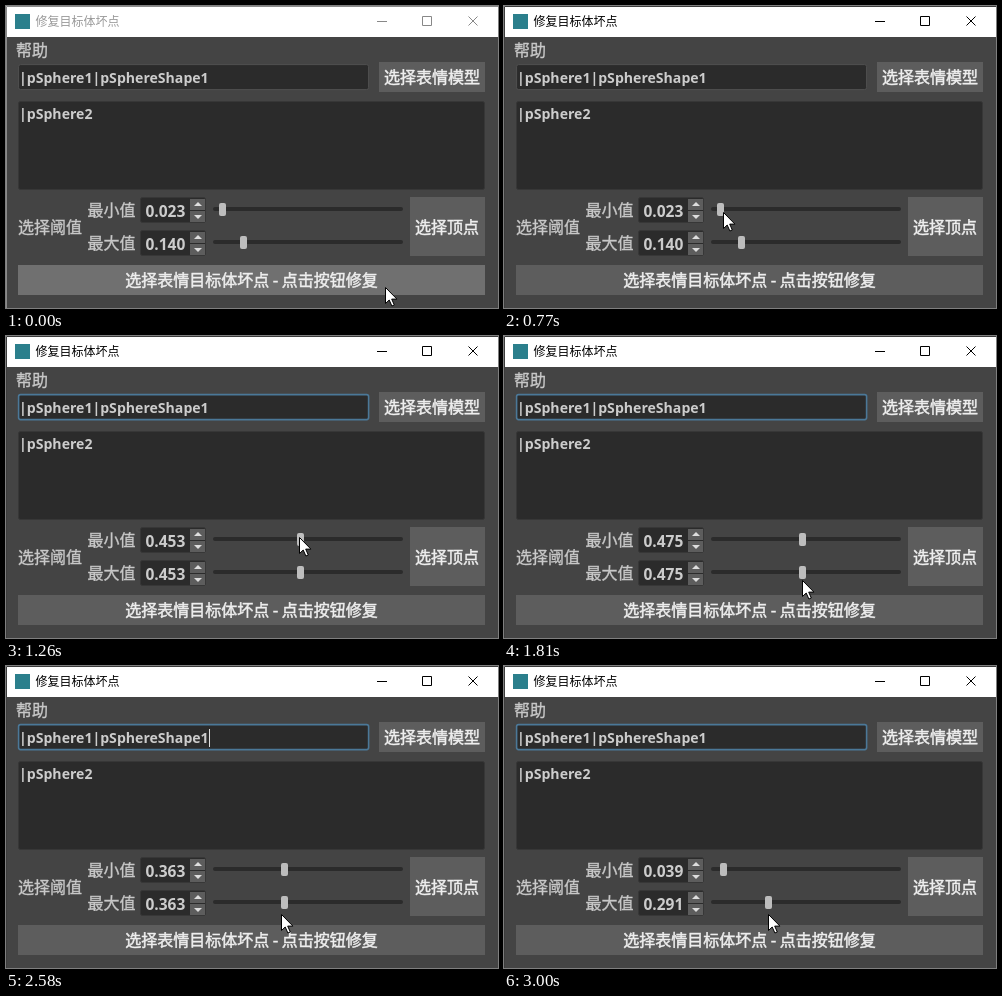
Write an HTML page that moves like this. It is 492 px wide and 302 px high and loops after 3.07 s.

```html
<!DOCTYPE html>
<html lang="zh">
<head>
<meta charset="utf-8">
<title>修复目标体坏点</title>
<style>
html, body { margin: 0; width: 100%; height: 100%; overflow: hidden; background: #444; }
svg { display: block; }
text { font: 400 16px "Noto Sans CJK SC", "Noto Sans CJK", sans-serif; white-space: pre; }
.latin, .num { font: 700 14.1px "Open Sans", sans-serif; fill: #ccc; }
.num { font-size: 15.5px; }
.label { fill: #c8c8c8; stroke: #c8c8c8; stroke-width: .35; }
.push { fill: #eee; stroke: #eee; stroke-width: .5; text-anchor: middle; }
.title { font-size: 12px; }
.btn { fill: #5d5d5d; }
.box { fill: #2b2b2b; stroke: #373737; }
.groove { fill: #2b2b2b; }
.handle { fill: #bdbdbd; }
.arrow { fill: #ddd; }
#field { stroke: #505050; }
#field.focused { stroke: #4b7898; stroke-width: 1.6; }
</style>
</head>
<body>
<svg width="492" height="302" viewBox="0 0 492 302">
  <rect width="492" height="302" fill="#444"/>
  <rect width="492" height="31" fill="#fff"/>
  <rect x="9" y="8" width="15" height="15" fill="#2b7f8c"/>
  <text id="title" class="title" x="29.5" y="20">修复目标体坏点</text>
  <path id="controls" fill="none" d="M371 15.5h10M416.5 10.5h9v9h-9zM462.5 10.5l9 9m0-9l-9 9"/>
  <path id="frame" fill="none" d="M.5 302V.5H492"/>

  <text class="label" x="10" y="50">帮助</text>
  <rect id="field" class="box" x="12.6" y="58.6" width="350" height="25" rx="2"/>
  <text class="latin" x="13" y="77">|pSphere1|pSphereShape1</text>
  <rect id="caret" x="203" y="63" width="1" height="18" fill="#ddd"/>
  <rect class="btn" x="373" y="56" width="106" height="30"/>
  <text class="push" x="426" y="77">选择表情模型</text>

  <rect class="box" x="12.5" y="95.5" width="466" height="88" rx="2"/>
  <text class="latin" x="13" y="113">|pSphere2</text>

  <text class="label" x="12" y="227">选择阈值</text>
  <g id="rows"></g>
  <rect class="btn" x="404" y="191" width="75" height="59"/>
  <text class="push" x="441" y="227">选择顶点</text>

  <rect id="fix" class="btn" x="12" y="259" width="467" height="30"/>
  <text class="push" x="245.5" y="280">选择表情目标体坏点 - 点击按钮修复</text>

  <path id="cursor" d="M.5 .5v16l3.7-3.5 2.7 6 2.4-1-2.6-5.9h5.2z" fill="#fff" stroke="#000"/>
</svg>
<script>
const LOOP = 3070, STEP = 70, TRAVEL = 182;
const $ = id => document.getElementById(id);

const row = (name, y) => `
  <text class="label" x="81.5" y="${y + 7}">${name}</text>
  <rect class="box" x="134.5" y="${y - 11.5}" width="65" height="25" rx="2"/>
  <path class="btn" d="M184 ${y - 10}h15v11h-15zm0 12h15v11h-15z"/>
  <path class="arrow" d="M188 ${y - 3}h8l-4-4zm0 9h8l-4 4z"/>
  <text class="num" x="139.5" y="${y + 8}"></text>
  <rect class="groove" x="207" y="${y - 2}" width="190" height="4" rx="2"/>
  <rect class="handle" y="${y - 6}" width="7" height="13" rx="2"/>`;

$("rows").innerHTML = row("最小值", 203) + row("最大值", 236);
const numbers = document.querySelectorAll(".num");
const handles = document.querySelectorAll(".handle");

// Linear progress from 0 to 1 between two times
const ramp = (t, from, to) => Math.min(1, Math.max(0, (t - from) / (to - from)));

// Lower limit while its handle is dragged
const lowDrag = t => .023 + .43 * ramp(t, 770, 1260) + .022 * ramp(t, 1400, 1470);

// Upper limit while its handle is dragged: right, far left, back
const highDrag = t => .475 + .165 * ramp(t, 1810, 2300)
  - .601 * ramp(t, 2370, 2826) + .252 * ramp(t, 2826, 3000);

// The two limits push each other along when they meet
function limits(t) {
  const low = lowDrag(t), high = highDrag(t);
  if (t < 1810) return [low, Math.max(.14, low)];
  return [t < 2826 ? Math.min(low, high) : .039, high];
}

function pointer(t) {
  const enter = ramp(t, 0, 280), reach = ramp(t, 280, 630);
  const drag = ramp(t, 770, 1260), down = ramp(t, 1400, 1740), sink = ramp(t, 1810, 2580);
  // the handle trails the pointer by 10 ms
  const pull = TRAVEL * (highDrag(t + 10) - highDrag(0)) * (t > 1810);
  return [
    379 - 120 * enter - 40 * reach + 74 * drag + 4.5 * down + pull,
    281 - 67 * enter - 8 * reach - 5 * drag + 43 * down + 4 * sink
  ].map(Math.round);
}

function draw(t) {
  const shift = t < 1740 ? 0 : 10;
  t = Math.floor((t + shift) / STEP) * STEP - shift;

  const active = t >= 700, focused = t >= 840;
  $("title").style.fill = active ? "#000" : "#999";
  $("controls").style.stroke = active ? "#000" : "#888";
  $("frame").style.stroke = active ? "#3c3c3c" : "#8a8a8a";
  $("field").classList.toggle("focused", focused);
  $("caret").style.opacity = focused && (t - 770) % 560 < 280 ? 1 : 0;

  limits(t).forEach((v, i) => {
    numbers[i].textContent = v.toFixed(3);
    handles[i].setAttribute("x", Math.round(208.5 + TRAVEL * v));
  });

  const [x, y] = pointer(t);
  $("cursor").setAttribute("transform", `translate(${x} ${y})`);
  $("fix").style.fill = y >= 259 ? "#707070" : "";
}

function tick() {
  draw(performance.now() % LOOP);
  requestAnimationFrame(tick);
}
tick();
</script>
</body>
</html>
```
